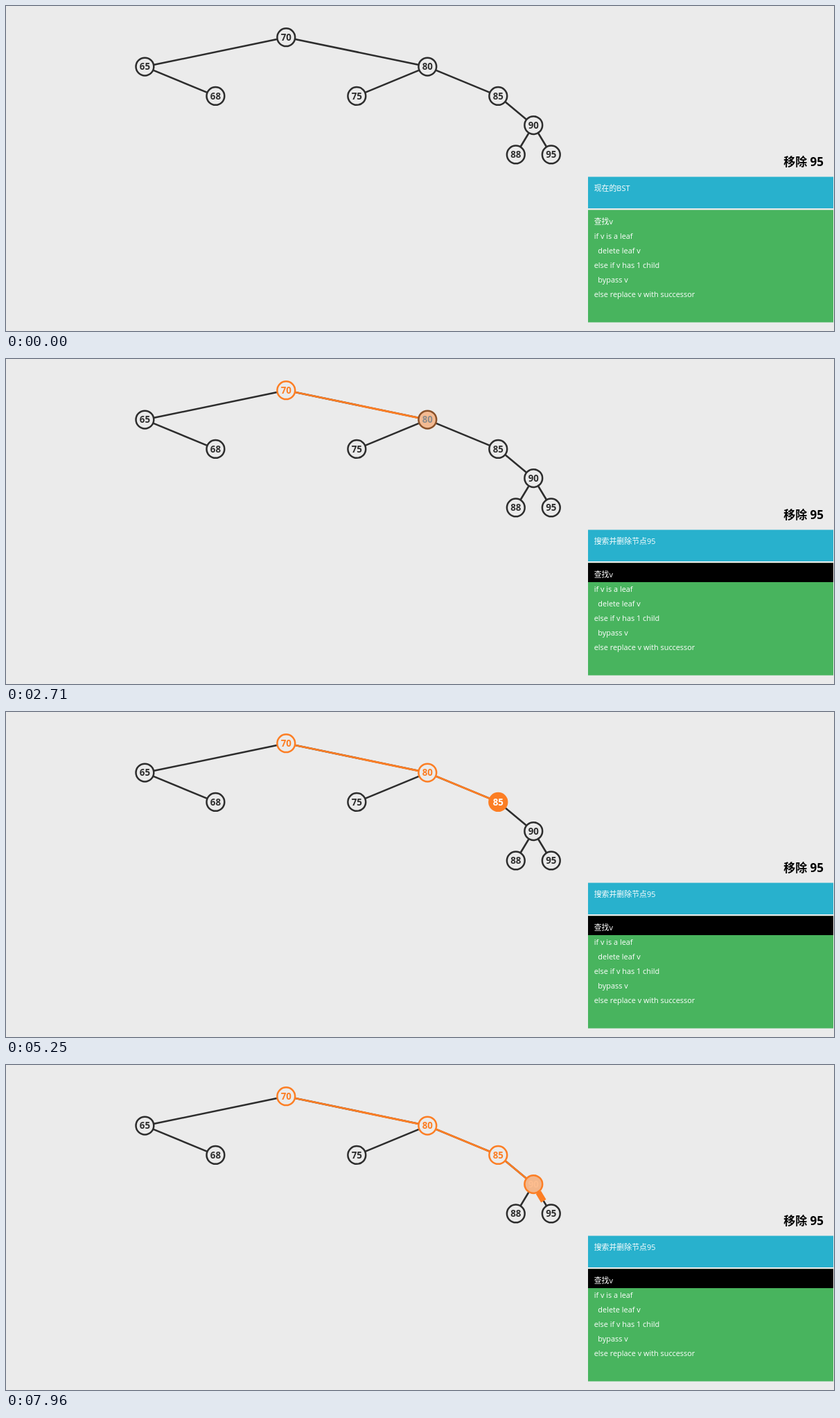
Write an HTML page that moves like this. It is 1195 px wide and 469 px high and loops after 8000 ms.

```html
<!DOCTYPE html>
<html lang="zh-CN">
<head>
<meta charset="utf-8">
<title>BST 移除</title>
<style>
  html, body { margin: 0; width: 100%; height: 100%; overflow: hidden; background: #ebebeb; }
  svg { display: block; width: 1195px; height: 469px; }
  text { font-family: "Open Sans", "Noto Sans", "Noto Sans CJK SC", "Noto Sans CJK", sans-serif; white-space: pre; }
  .edge { stroke: #2d2d2d; stroke-width: 2.55; }
  .node circle { fill: #ebebeb; stroke: #2d2d2d; stroke-width: 2.5; }
  .node text { fill: #2d2d2d; font-size: 13.3px; font-weight: 700; text-anchor: middle; }
  .title { font-size: 17px; font-weight: 700; text-anchor: end; }
  .status { font-size: 10.9px; font-weight: 500; fill: #fff; }
  .code { font-family: "Liberation Mono", "Noto Sans CJK SC", "Noto Sans CJK", monospace; font-size: 10.9px; fill: #fff; }
  .code .zh { font-weight: 500; }
</style>
</head>
<body>
<svg viewBox="0 0 1195 469">
  <g id="edges"></g>
  <g id="hot"></g>
  <g id="nodes"></g>
  <text class="title" x="1180" y="231.3">移除 95</text>
  <rect x="840" y="246.5" width="354" height="45.5" fill="#28b1cd"/>
  <text id="status" class="status" x="848.7" y="266.8"></text>
  <rect x="840" y="294.3" width="354" height="162.2" fill="#48b45e"/>
  <rect id="bar" x="840" y="294.3" width="354" height="27.7"/>
  <g id="code" class="code">
    <text x="848.7" y="314.6"><tspan class="zh">查找</tspan>v</text>
  </g>
</svg>
<script>
const LOOP = 8000, START = 138, STEP = 1045.6, FADE = 1000, GROW = 900, R = 13.6;
const DARK = [45, 45, 45], ORANGE = [252, 126, 36], PAPER = [235, 235, 235], WHITE = [255, 255, 255];

// Node looks: [fill, stroke, label]
const IDLE = [PAPER, DARK, DARK], FULL = [ORANGE, ORANGE, WHITE], SEEN = [PAPER, ORANGE, ORANGE];

const tree = {
  70: [404.3, 45.2], 65: [200.4, 87.6], 80: [608.3, 87.6], 68: [302.4, 129.9], 75: [506.3, 129.9],
  85: [710.3, 129.9], 90: [761.3, 172.1], 88: [735.8, 214.4], 95: [786.8, 214.4]
};
const links = [[70, 65], [70, 80], [65, 68], [80, 75], [80, 85], [85, 90], [90, 88], [90, 95]];
const route = [70, 80, 85, 90, 95];
const lines = ['if v is a leaf', '  delete leaf v', 'else if v has 1 child', '  bypass v', 'else replace v with successor'];

const $ = id => document.getElementById(id);

function add(parent, tag, attrs, text) {
  const el = document.createElementNS('http://www.w3.org/2000/svg', tag);
  for (const key in attrs) el.setAttribute(key, attrs[key]);
  if (text !== undefined) el.textContent = text;
  return parent.appendChild(el);
}

// Segment between the rims of two nodes
function span(a, b) {
  const [x1, y1] = tree[a], [x2, y2] = tree[b];
  const k = R / Math.hypot(x2 - x1, y2 - y1), dx = (x2 - x1) * k, dy = (y2 - y1) * k;
  return { x1: x1 + dx, y1: y1 + dy, x2: x2 - dx, y2: y2 - dy };
}

for (const [a, b] of links) add($('edges'), 'line', { class: 'edge', ...span(a, b) });

const nodes = {};
for (const key in tree) {
  const [x, y] = tree[key], g = add($('nodes'), 'g', { class: 'node' });
  nodes[key] = {
    disc: add(g, 'circle', { cx: x, cy: y, r: 12.9 }),
    label: add(g, 'text', { x, y: y + 4.7 }, key)
  };
}

const trail = route.slice(1).map((key, i) => {
  const seg = span(route[i], key);
  return { seg, el: add($('hot'), 'line', { ...seg, stroke: `rgb(${ORANGE})` }) };
});

lines.forEach((line, i) => add($('code'), 'text', { x: 848.7, y: 336 + i * 21.1 }, line));

const clamp = u => Math.min(1, Math.max(0, u));
const ease = u => u < 0.5 ? 4 * u ** 3 : 1 - 4 * (1 - u) ** 3;
const mix = (a, b, k) => a + (b - a) * k;

function paintNode({ disc, label }, from, to, k) {
  const [fill, stroke, ink] = from.map((c, i) => `rgb(${c.map((v, j) => Math.round(mix(v, to[i][j], k)))})`);
  disc.style.fill = fill;
  disc.style.stroke = stroke;
  label.style.fill = ink;
}

function paintTrail({ seg, el }, u) {
  const k = ease(clamp(u));
  el.setAttribute('visibility', u > 0 ? 'visible' : 'hidden');
  el.setAttribute('stroke-width', u < 1 ? 8.5 : 2.7);
  el.setAttribute('x2', mix(seg.x1, seg.x2, k));
  el.setAttribute('y2', mix(seg.y1, seg.y2, k));
}

function draw(t) {
  const running = t >= START;
  $('status').textContent = running ? '搜索并删除节点95' : '现在的BST';
  $('bar').setAttribute('visibility', running ? 'visible' : 'hidden');
  trail.forEach((edge, i) => {
    const enter = t - START - 2 * i * STEP, leave = enter - STEP;
    const node = nodes[route[i]];
    if (leave < 0) paintNode(node, IDLE, FULL, ease(clamp(enter / FADE)));
    else paintNode(node, FULL, SEEN, ease(clamp(leave / FADE)));
    paintTrail(edge, leave / GROW);
  });
}

const begin = performance.now();
function tick() {
  draw((performance.now() - begin) % LOOP);
  requestAnimationFrame(tick);
}
tick();
</script>
</body>
</html>
```
